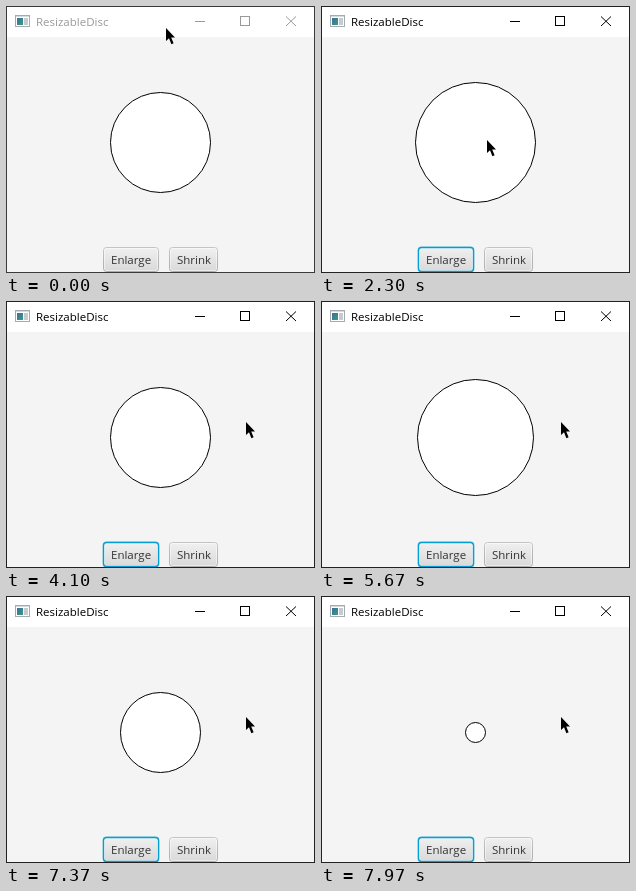
An HTML page that plays this animation: 309x267 px, repeating every 8000 ms.

```html
<!DOCTYPE html>
<html lang="en">
<head>
<meta charset="utf-8">
<title>ResizableDisc</title>
<style>
  html, body { margin: 0; width: 100%; height: 100%; overflow: hidden; background: #f4f4f4; }
  svg { display: block; width: 309px; height: 267px; }
  text { font: 11.5px "Open Sans", "Noto Sans", sans-serif; fill: #333; }
  #win { --ink: #000; --edge: #222; }
  #win.idle { --ink: #999; --edge: #3a3a3a; }
  #caption { fill: var(--ink); }
  #controls { stroke: var(--ink); fill: none; }
  #edge { stroke: var(--edge); fill: none; }
  .idle #focus { display: none; }
</style>
</head>
<body>
<svg id="win" class="idle" viewBox="0 0 309 267">
  <defs>
    <linearGradient id="face" x1="0" y1="0" x2="0" y2="1">
      <stop offset="0" stop-color="#f0f0f0"/>
      <stop offset="1" stop-color="#d9d9d9"/>
    </linearGradient>
    <linearGradient id="rim" x1="0" y1="0" x2="0" y2="1">
      <stop offset="0" stop-color="#c4c4c4"/>
      <stop offset="1" stop-color="#acacac"/>
    </linearGradient>
    <linearGradient id="pane" x1="0" y1="0" x2="1" y2="1">
      <stop offset="0" stop-color="#3a6ea0"/>
      <stop offset="1" stop-color="#3c9a80"/>
    </linearGradient>
  </defs>
  <rect width="309" height="267" fill="#f4f4f4"/>
  <rect width="309" height="31" fill="#fff"/>

  <g id="icon">
    <rect x="9.5" y="9.5" width="14" height="11" fill="#fff" stroke="#a5acb0"/>
    <path d="M10 10.5h13" stroke="#d3d9dc"/>
    <rect x="11" y="12" width="6" height="7" fill="url(#pane)"/>
    <rect x="18" y="12" width="4" height="7" fill="#c5cbce"/>
  </g>
  <text id="caption" x="30" y="20">ResizableDisc</text>
  <g id="controls">
    <path d="M189 15.5h10"/>
    <rect x="234.5" y="10.5" width="9" height="9"/>
    <path d="M280 10.5l10 9.5M290 10.5l-10 9.5"/>
  </g>

  <circle id="disc" cx="154.5" cy="136.5" r="50" fill="#fff" stroke="#000"/>

  <g>
    <rect x="97.5" y="241.5" width="55" height="24" rx="3" fill="url(#face)" stroke="url(#rim)"/>
    <rect x="98.5" y="242.5" width="53" height="22" rx="2" fill="none" stroke="#fff" stroke-opacity=".5"/>
    <g id="focus" fill="none">
      <rect x="96.5" y="240.5" width="57" height="26" rx="4" stroke="#039ed3" stroke-opacity=".2"/>
      <rect x="97.5" y="241.5" width="55" height="24" rx="3" stroke="#039ed3" stroke-width="1.3"/>
    </g>
    <text x="105" y="258">Enlarge</text>
  </g>
  <g>
    <rect x="163.5" y="241.5" width="48" height="24" rx="3" fill="url(#face)" stroke="url(#rim)"/>
    <rect x="164.5" y="242.5" width="46" height="22" rx="2" fill="none" stroke="#fff" stroke-opacity=".5"/>
    <text x="171" y="258">Shrink</text>
  </g>
  <rect id="edge" x=".5" y=".5" width="308" height="266"/>
  <path id="pointer" d="M0 0V13L3 10.3L5.4 16.2L7.6 15.2L5.2 9.5H9Z"/>
</svg>
<script>
  const LOOP = 8000, WAKE = 730;
  const $ = id => document.getElementById(id);
  const win = $("win"), disc = $("disc"), pointer = $("pointer");

  // Clicks: each one changes the radius by 2
  const grow = [830, 1170, 1430, 1730, 2000, 5000, 5230, 5470, 5670];
  const shrink = [2630, 2900, 3170, 3470, 3800, 6000, 6230, 6470, 6730];
  // Rapid shrinking at the end
  for (let i = 0; i < 20; i++) {
    shrink.push(i < 4 ? 7230 + 35 * i : 7370 + 40 * (i - 4));
  }

  // Pointer moves: start, end, number of steps, path
  const moves = [
    [136.7, 570, 13, "M160 22C176 50 202 85 202 125C202 155 192 172 180 172C168 172 160 160 155 150"],
    [2000, 2300, 6, "M155 150Q163 143 166 134"],
    [3800, 4100, 7, "M166 134Q205 131 240 121"]
  ].map(([from, to, steps, d]) => {
    const path = document.createElementNS("http://www.w3.org/2000/svg", "path");
    path.setAttribute("d", d);
    return { from, to, steps, path, size: path.getTotalLength() };
  });

  const past = (times, t) => times.filter(x => x <= t).length;

  function pointerAt(t) {
    const m = moves.filter(x => x.from <= t).pop() || moves[0];
    const u = Math.min(1, Math.max(0, (t - m.from) / (m.to - m.from)));
    const k = Math.floor(u * m.steps + 0.001) / m.steps;
    const eased = k * k * (3 - 2 * k);
    return m.path.getPointAtLength(eased * m.size);
  }

  function draw(t) {
    win.classList.toggle("idle", t < WAKE);
    disc.setAttribute("r", 50 + 2 * (past(grow, t) - past(shrink, t)));
    const p = pointerAt(t);
    pointer.setAttribute("transform", `translate(${Math.round(p.x)} ${Math.round(p.y)})`);
  }

  const start = performance.now();
  function tick() {
    draw((performance.now() - start) % LOOP);
    requestAnimationFrame(tick);
  }
  tick();
</script>
</body>
</html>
```
